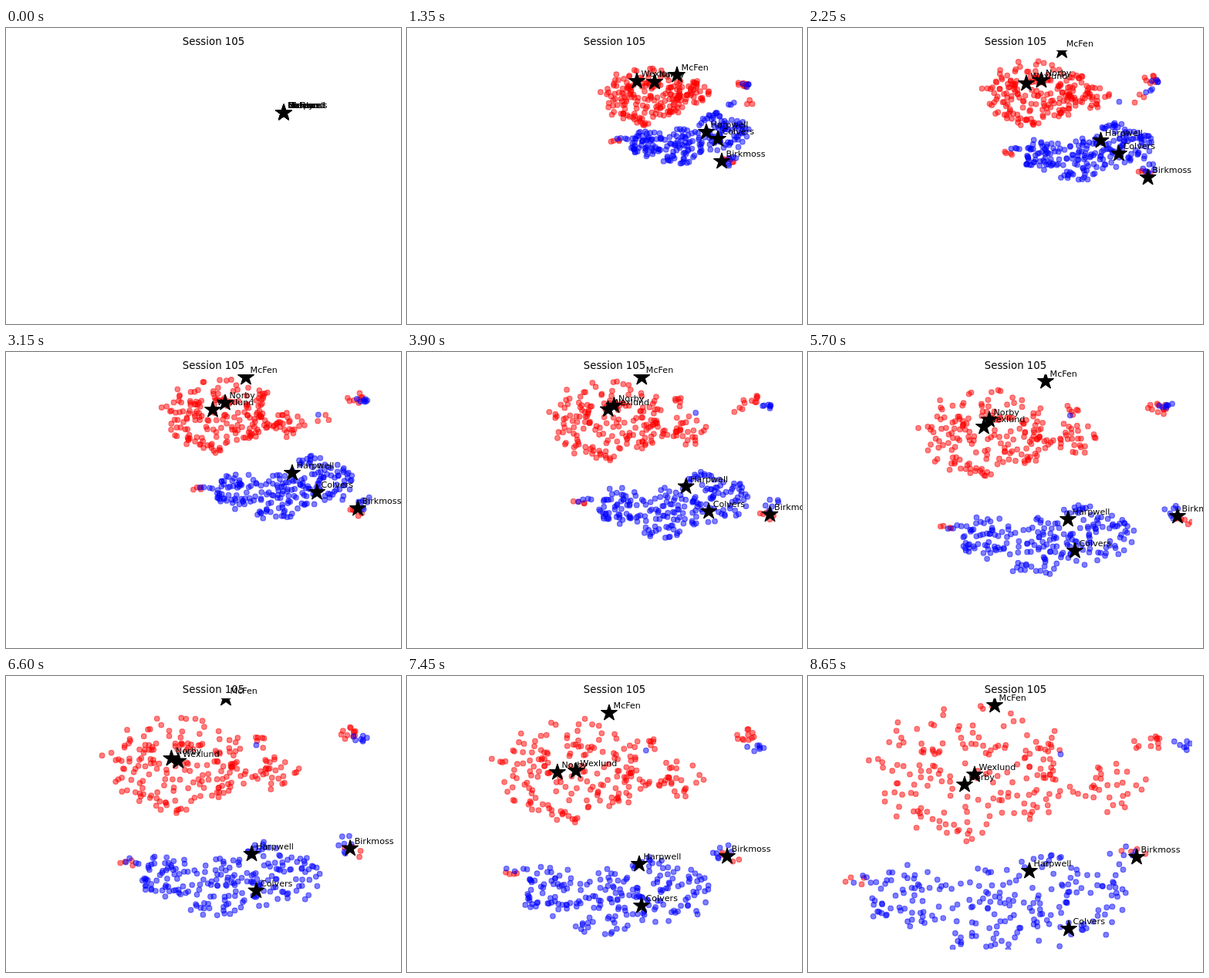
Animation of 512x384 px, one loop 8.7 s. Source, as an HTML page:

```html
<!DOCTYPE html>
<html lang="en">
<head>
<meta charset="utf-8">
<title>Session 105</title>
<style>
  html, body { margin: 0; width: 100%; height: 100%; overflow: hidden; background: #fff; }
  svg { display: block; }
  text { font: 11.11px "DejaVu Sans", sans-serif; fill: #000; }
  .title { font-size: 13.33px; text-anchor: middle; }
  .dot { fill-opacity: .5; stroke-opacity: .5; stroke-width: 1.11; }
  .star { stroke: #000; stroke-width: 1.11; stroke-linejoin: bevel; }
</style>
</head>
<body>
<svg width="512" height="384" viewBox="0 0 512 384">
  <clipPath id="plot"><rect x="40" y="29" width="458" height="326"/></clipPath>
  <g clip-path="url(#plot)"><g id="dots"></g><g id="stars"></g></g>
  <text class="title" x="269" y="22.3">Session 105</text>
  <g id="labels"></g>
</svg>
<script>
const LOOP = 8700, STEP = 50;
const TIMES = [1350, 3150, 4600, 5700, 7450, 8650];
const START = [0, 360, 110];
const SPREAD = [[0, 0], ...[.42, .54, .63, .65, .76, 1].map((s, i) => [TIMES[i], s])];

// Six x,y pairs at TIMES, plus optional [t, x, y] stops in between.
function path(xy, extra = []) {
  const stops = TIMES.map((t, i) => [t, xy[2 * i], xy[2 * i + 1]]);
  return [START, ...stops, ...extra].sort((a, b) => a[0] - b[0]);
}

// Quick square-root growth out of the first stop, linear afterwards.
function at(stops, t) {
  let i = 1;
  while (i < stops.length - 1 && t > stops[i][0]) i++;
  const a = stops[i - 1], b = stops[i];
  let k = Math.min(1, (t - a[0]) / (b[0] - a[0]));
  if (i === 1) k = Math.sqrt(k);
  return a.slice(1).map((v, j) => v + (b[j + 1] - v) * k);
}

let seed = 105;
function rand() {
  seed = (seed + 0x6D2B79F5) | 0;
  let r = Math.imul(seed ^ (seed >>> 15), 1 | seed);
  r = (r + Math.imul(r ^ (r >>> 7), 61 | r)) ^ r;
  return ((r ^ (r >>> 14)) >>> 0) / 4294967296;
}

function add(parent, tag, attrs) {
  const el = document.createElementNS("http://www.w3.org/2000/svg", tag);
  for (const name in attrs) el.setAttribute(name, attrs[name]);
  return document.getElementById(parent).appendChild(el);
}

// Clouds: colour, count, final radii, centres
const RED = "#f00", BLUE = "#00f";
const clouds = [
  [RED, 172, 137, 87, [308, 88, 272, 82, 248, 95, 230, 106, 212, 122, 208, 124]],
  [RED, 30, 50, 32, [372, 86, 360, 95, 358, 112, 342, 114, 345, 137, 388, 146]],
  [RED, 6, 18, 14, [372, 72, 332, 55, 365, 72, 342, 76, 315, 88, 303, 93]],
  [RED, 8, 24, 9, [437, 74, 456, 60, 446, 64, 456, 73, 442, 78, 446, 84]],
  [RED, 3, 24, 10, [444, 97, 412, 86, 447, 64, 455, 72, 440, 76, 440, 84]],
  [RED, 4, 13, 6, [271, 146, 250, 177, 201, 211, 181, 227, 136, 255, 64, 264]],
  [RED, 5, 16, 14, [418, 172, 453, 207, 482, 217, 487, 219, 417, 235, 424, 231]],
  [BLUE, 50, 50, 42, [310, 150, 298, 180, 258, 221, 231, 241, 188, 278, 130, 288]],
  [BLUE, 72, 78, 56, [351, 153, 348, 187, 313, 231, 294, 252, 250, 292, 225, 302]],
  [BLUE, 86, 84, 62, [408, 136, 407, 168, 386, 212, 368, 238, 332, 280, 335, 292]],
  [BLUE, 1, 1, 1, [402, 110, 405, 81, 346, 76, 340, 82, 310, 96, 328, 101]],
  [BLUE, 4, 14, 9, [440, 73, 463, 62, 471, 75, 464, 68, 453, 90, 485, 87]],
  [BLUE, 3, 12, 6, [418, 98, 463, 62, 468, 73, 463, 69, 453, 92, 486, 87]],
  [BLUE, 4, 20, 8, [278, 142, 256, 174, 206, 209, 186, 227, 140, 252, 68, 263]],
  [BLUE, 7, 24, 18, [421, 172, 465, 197, 485, 200, 475, 208, 410, 230, 414, 236]]
].map(([color, n, rx, ry, xy]) => ({
  stops: path(xy),
  dots: Array.from({ length: n }, () => {
    const a = rand() * 2 * Math.PI, r = Math.pow(rand(), .55);
    return {
      x: rx * r * Math.cos(a), y: ry * r * Math.sin(a),
      phase: rand() * 6.28, rate: .001 + rand() * .002, sway: Math.min(4, rx * .2),
      el: add("dots", "circle", { class: "dot", r: 3.33, fill: color, stroke: color })
    };
  })
}));

const starShape = Array.from({ length: 10 }, (_, i) => {
  const r = i % 2 ? 4.24 : 11.11, a = i * Math.PI / 5;
  return (r * Math.sin(a)).toFixed(2) + "," + (-r * Math.cos(a)).toFixed(2);
}).join(" ");

const members = [
  ["McFen", [350, 61, 311, 33, 298, 33, 308, 38, 262, 48, 242, 38],
    [[800, 355, 31], [1750, 340, 35], [2300, 328, 29], [5000, 302, 28], [6600, 285, 29], [7950, 253, 30]]],
  ["Norby", [321, 70, 284, 66, 254, 73, 235, 88, 195, 125, 203, 141]],
  ["Wexlund", [298, 69, 268, 75, 254, 74, 228, 97, 219, 123, 216, 128]],
  ["Harpwell", [388, 135, 371, 157, 353, 191, 337, 217, 301, 244, 287, 253]],
  ["Colvers", [403, 144, 403, 182, 380, 230, 346, 258, 304, 298, 338, 328]],
  ["Birkmoss", [408, 173, 456, 203, 484, 218, 479, 213, 415, 234, 426, 235],
    [[1750, 432, 189]]]
].map(([name, xy, extra]) => {
  const label = add("labels", "text", {});
  label.textContent = name;
  return { stops: path(xy, extra), label, star: add("stars", "polygon", { class: "star", points: starShape }) };
});

function draw(t) {
  const [spread] = at(SPREAD, t);
  for (const { stops, dots } of clouds) {
    const [cx, cy] = at(stops, t);
    for (const d of dots) {
      const w = d.phase + t * d.rate;
      d.el.setAttribute("cx", cx + spread * (d.x + d.sway * Math.sin(w)));
      d.el.setAttribute("cy", cy + spread * (d.y + d.sway * Math.cos(w * 1.3)));
    }
  }
  for (const { stops, star, label } of members) {
    const [x, y] = at(stops, t);
    star.setAttribute("transform", `translate(${x} ${y})`);
    label.setAttribute("x", x + 5.56);
    label.setAttribute("y", y - 5.56);
  }
}

const begin = performance.now();
let shown = -1;
function tick() {
  const t = Math.floor(((performance.now() - begin) % LOOP) / STEP) * STEP;
  if (t !== shown) draw(shown = t);
  requestAnimationFrame(tick);
}
tick();
</script>
</body>
</html>
```
